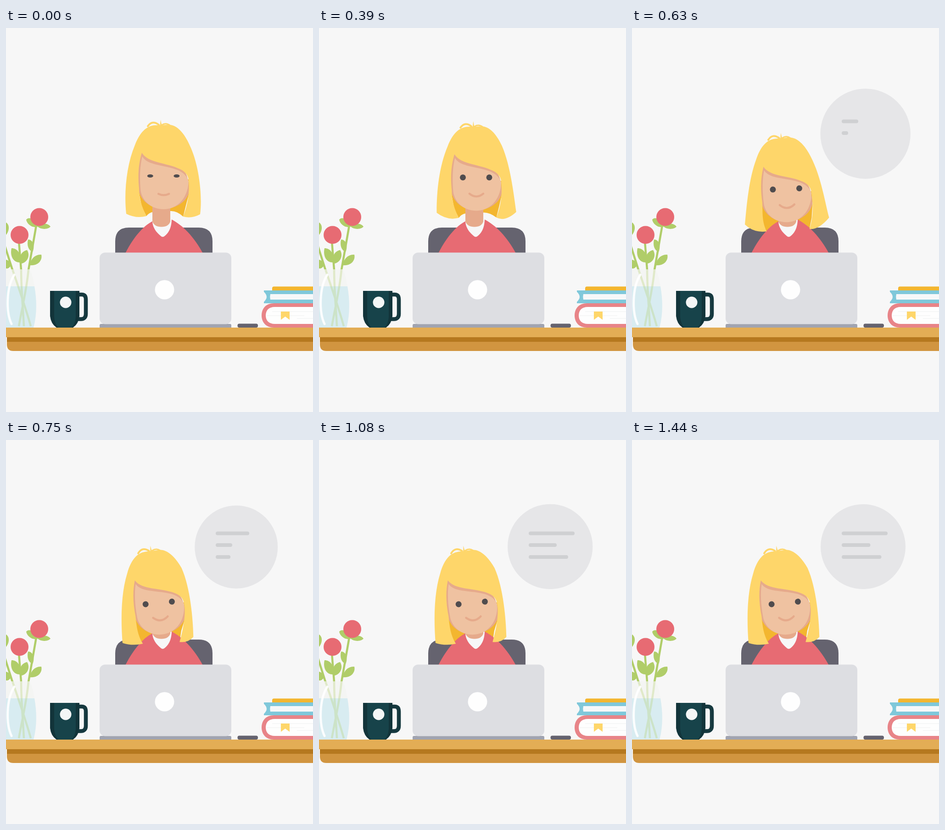
An HTML page that plays this animation: 669 by 837 pixels, repeating every 1.47 s.

```html
<!DOCTYPE html>
<html lang="en">
<head>
<meta charset="utf-8">
<title>Woman at a desk</title>
<style>
html, body { margin: 0; width: 100%; height: 100%; overflow: hidden; background: #f7f7f7; }
svg { display: block; width: 100%; height: 100%; }
.hair { fill: #fed66a; }
.strand { fill: none; stroke: #fed66a; stroke-linecap: round; }
.deep { fill: #f3b62f; }
.skin { fill: #efc2a1; }
.shade { fill: #e6aa8b; }
.red { fill: #e76b73; }
.slate { fill: #65636f; }
.leaf { fill: #b0cd69; }
.stem { fill: none; stroke: #b0cd69; stroke-width: 4.5; }
.blue { fill: #7fc8da; }
.eye { fill: #504c4e; }
.bar { fill: #cfd0d2; }
</style>
</head>
<body>
<svg viewBox="0 0 669 837">
  <rect width="669" height="837" fill="#f7f7f7"/>

  <circle id="bubble" fill="#e6e6e8"/>
  <g class="bar">
    <rect id="bar0" x="457" y="199.5" height="8" rx="4"/>
    <rect id="bar1" x="457" y="225" height="8" rx="4"/>
    <rect id="bar2" x="457" y="251" height="8" rx="4"/>
  </g>

  <!-- chair and body -->
  <path class="slate" d="M238 495V465Q238 435 268 435H420Q450 435 450 465V495Z"/>
  <g id="headBack"><path id="hairBack" class="deep"/></g>
  <path class="red" d="M260 491C280 451 304 428 320 421L360 417C386 430 410 456 429 491Z"/>
  <path fill="#f7f7f7" d="M319 420C319 438 332 449 338 454Q341.500 456.500 345 454C353 448 361 437 361 416Z"/>
  <path class="shade" d="M319 375H358V422Q354 433.500 338.500 433.500Q324 433.500 319 422Z"/>

  <!-- head -->
  <g id="head">
    <path class="shade" d="M295 268C310 290 350 288 380 304Q399 314 399 357C395 377 372 394 344 394C308 394 288 368 288 345C286 315 288 290 295 268Z"/>
    <path class="skin" d="M297 280C308 300 345 298 375 310C388 316 396 325 398 334C396 375 370 395 344 395C312 395 294 372 293 350C291 325 292 300 297 280Z"/>
    <ellipse id="eyeL" class="eye" cx="314.300" rx="6.500"/>
    <ellipse id="eyeR" class="eye" cx="371.800" rx="6.500"/>
    <path id="mouth" fill="none" stroke="#e6aa8b" stroke-width="4.500" stroke-linecap="round"/>
    <path id="hair" class="hair"/>
    <path class="strand" stroke-width="4" d="M309 214Q319 200 333 211"/>
    <path class="strand" stroke-width="3" d="M340 211Q349 206 357 212"/>
    <path class="hair" d="M337 200L339.500 213H335.500Z"/>
  </g>

  <!-- laptop and phone -->
  <path fill="#a1a4b0" d="M204 653V648Q204 645 207 645H488Q491 645 491 648V653Z"/>
  <rect x="204" y="489.500" width="287" height="156" rx="12" fill="#dddee2"/>
  <circle cx="345.500" cy="570.500" r="21" fill="#fefefe"/>
  <path class="slate" d="M504.500 648.500Q504.500 644.500 508.500 644.500H545Q549 644.500 549 648.500V649Q549 653 545 653H508.500Q504.500 653 504.500 649Z"/>

  <!-- flowers and vase -->
  <path class="stem" d="M66 430L49 527M28 465L33 527M-4 470L14 527"/>
  <g class="leaf">
    <path d="M44 418C48 411 62 414 70 430C78 424 92 425 97 433C92 439 77 440 69 433C58 437 46 428 44 418Z"/>
    <path d="M48 461C58 461 64 474 58 488C49 485 45 474 48 461Z"/>
    <path d="M12 480C26 480 34 494 31 511C17 512 8 498 12 480Z"/>
    <path d="M46 484C53 495 48 511 32 514C27 501 32 487 46 484Z"/>
    <path d="M77 494C80 506 70 519 52 517C53 504 63 493 77 494Z"/>
    <path d="M0 424C8 428 8 442 0 451Z"/>
    <path d="M0 505C6 506 10 511 11 518C6 524 3 525 0 524Z"/>
  </g>
  <circle class="red" cx="72.500" cy="412" r="19.500"/>
  <circle class="red" cx="29.500" cy="451" r="19.500"/>
  <path fill="#f4f5f3" d="M0 526H53Q59 545 62 563H0Z"/>
  <path fill="#d8ecf1" d="M0 563H62C67 592 68 622 60 653H0Z"/>
  <path class="stem" opacity=".3" d="M49 526C46 565 34 615 28 650M33 526C33 570 37 610 39 650M14 526C27 565 43 610 54 650"/>
  <path d="M18 538C0 566 0 620 12 645" fill="none" stroke="#fff" stroke-width="5" stroke-linecap="round" opacity=".9"/>

  <!-- mug -->
  <path d="M158 581H165Q174 581 174 592V623Q174 634.500 163 634.500H156" fill="none" stroke="#16393f" stroke-width="8.500"/>
  <path fill="#12343a" d="M96 573H160V628Q158 645 146 653H110Q98 645 96 628Z"/>
  <path fill="#17434a" d="M105 573H152V630Q151 645 143 653H114Q106 645 105 630Z"/>
  <circle cx="130" cy="598" r="12.500" fill="#f4f6f6"/>

  <!-- books -->
  <path class="deep" d="M669 563.500H584Q580 563.500 580 567.500V572H669Z"/>
  <rect x="570" y="576" width="99" height="20" fill="#f6f8f9"/>
  <path class="blue" d="M562 572H669V580H576Q574.500 586 576 592H669V600H562V597Q568 591 568 586Q568 581 562 575Z"/>
  <path fill="#e88488" d="M669 600H584C566 600 557 612 557 626.500C557 641 566 653 584 653H669Z"/>
  <path fill="#fefefe" d="M669 608H586C572 608 566 616 566 626.500C566 637 572 645 586 645H669Z"/>
  <path d="M580 618H669M568 627H650M634 633H669" stroke="#eeeff0" stroke-width="1"/>
  <path class="hair" d="M599 618H618V636L608.500 629L599 636Z"/>

  <!-- desk -->
  <path fill="#d19540" d="M2 674H669V704H16Q2 704 2 690Z"/>
  <rect x="2" y="674" width="667" height="10" fill="#b5781f"/>
  <rect y="653" width="669" height="21" fill="#e3ad55"/>
</svg>
<script>
const LOOP = 1470, STEP = 30;
const $ = id => document.getElementById(id);
const set = (id, attrs) => { for (const k in attrs) $(id).setAttribute(k, attrs[k]); };
const clamp = u => Math.max(0, Math.min(1, u));
const mix = (a, b, u) => a + (b - a) * u;
const smooth = (t, a, b) => { const u = clamp((t - a) / (b - a)); return u * u * (3 - 2 * u); };
const easeOut = (t, start, span) => 1 - (1 - clamp((t - start) / span)) ** 3;

// Hair ends at rest, flaring, falling back and settled:
// outer left tip, its handle, left hem, inner left, inner right, right hem, outer right tip, two handles
const times = [318, 510, 630, 750];
const poses = [
  [262,405, 257,360, 284,416, 306,410, 386,411, 405,416, 423,406, 428,370, 422,300],
  [247,388, 257,345, 273,420, 304,412, 390,407, 408,429, 447,380, 420,345, 411,295],
  [250,396, 255,360, 269,416, 297,413, 390,412, 410,415, 434,389, 427,360, 421,300],
  [256,405, 257,360, 277,414, 300,411, 380,415, 398,419, 411,407, 414,370, 415,300]
];
const shifts = [0, -2.5, -3.9, -3];

function blend(t, value) {
  let i = 0;
  while (i < 2 && t > times[i + 1]) i++;
  return value(i, smooth(t, times[i], times[i + 1]));
}

function drawHair(t) {
  const p = blend(t, (i, u) => poses[i].map((a, k) => mix(a, poses[i + 1][k], u)));
  const at = k => p[2 * k].toFixed(2) + ' ' + p[2 * k + 1].toFixed(2);
  const [lx, ly, rx, ry] = p.slice(6, 10);
  set('hair', { d: `M325 212C305 213 291 229 281 255C262 300 ${at(1)} ${at(0)}` +
    `Q${at(2)} ${at(3)}C${lx - 10} ${ly - 20} 290 372 290 350C287 320 289 295 296 272` +
    `C310 295 350 293 380 308C391 313 397 322 398 332C400 356 ${rx + 11} ${ry - 28} ${at(4)}` +
    `Q${at(5)} ${at(6)}C${at(7)} ${at(8)} 400 255C388 228 372 211 355 211Z` });
  set('hairBack', { d: `M288 330H399V360L${rx + 6} ${ry - 24}L${rx} ${ry}` +
    `Q372 398 358 399L320 401Q${lx + 5} 403 ${lx} ${ly}L${lx - 10} ${ly - 20}L288 350Z` });
}

function drawHead(t) {
  const dx = blend(t, (i, u) => mix(shifts[i], shifts[i + 1], u));
  const dy = 29.2 * smooth(t, 318, 666);
  const turn = -5.6 * smooth(t, 520, 755);
  const transform = `translate(${dx} ${dy}) rotate(${turn} 340 400)`;
  set('head', { transform });
  set('headBack', { transform });

  const eye = { cy: 322.5 + 3.4 * smooth(t, 620, 760), ry: mix(3.5, 6.5, smooth(t, 0, 150)) };
  set('eyeL', eye);
  set('eyeR', eye);

  const smile = smooth(t, 0, 540);
  const w = mix(11.5, 16, smile), y = mix(361.5, 357, smile);
  set('mouth', { d: `M${343.7 - w} ${y}Q343.700 ${mix(367, 371, smile)} ${343.7 + w} ${y}` });
}

// Grow to full size, then ring around it
function pop(t) {
  if (t < 543) {
    const u = clamp((t - 420) / 123);
    return u + 0.53 * u * (1 - u);
  }
  const s = t - 543;
  return 1 + 0.173 * 2 ** (-s / 80) * Math.sin(Math.PI * s / 120);
}

function drawBubble(t) {
  const r = 92.5 * pop(t);
  set('bubble', { r, cx: 420.3 + 0.9 * r, cy: 265.5 - 0.357 * r });
  [[553, 556, 100], [572, 714, 62.5], [680, 487, 86.5]].forEach(([start, span, width], i) =>
    set('bar' + i, { width: width * easeOut(t, start, span) }));
}

function draw(now) {
  const t = Math.floor((now % LOOP) / STEP) * STEP;
  drawHair(t);
  drawHead(t);
  drawBubble(t);
}

const begin = performance.now();
function tick() {
  draw(performance.now() - begin);
  requestAnimationFrame(tick);
}
tick();
</script>
</body>
</html>
```
